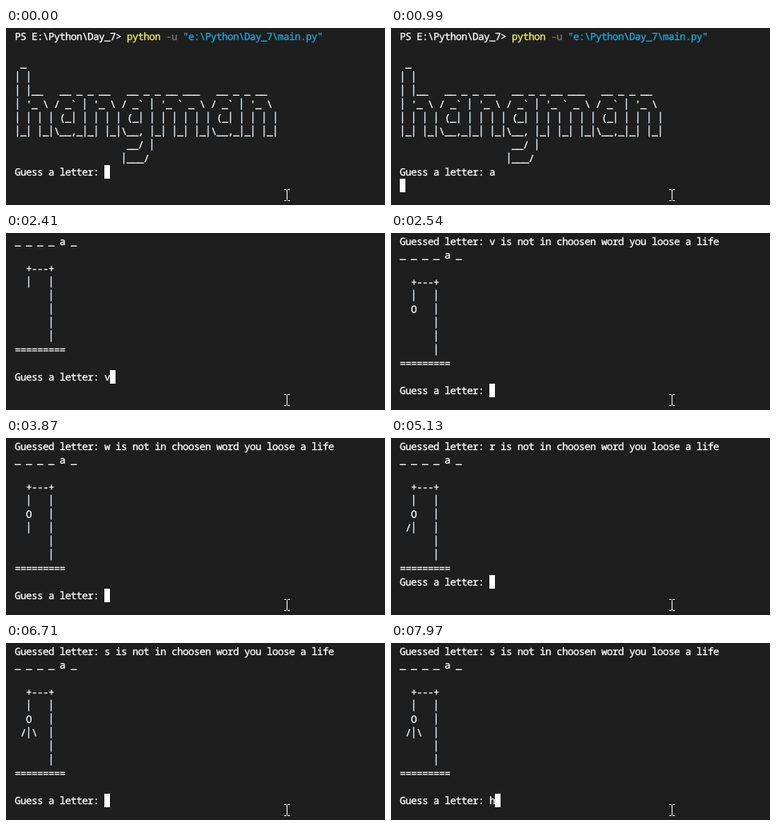
These frames come from a looping animation (474 by 222 pixels, 8000 ms). An HTML page:

```html
<!DOCTYPE html>
<html lang="en">
<head>
<meta charset="utf-8">
<title>Hangman in a terminal</title>
<style>
  html, body { margin: 0; width: 100%; height: 100%; overflow: hidden; background: #1e1e1e; }
  #stage { position: relative; width: 474px; height: 222px; overflow: hidden; }
  #screen {
    position: absolute; left: 11px; top: 2px; margin: 0;
    font: 12.5px/17px "Noto Sans Mono", "Liberation Mono", monospace;
    letter-spacing: -.5px; /* 7px cells */
    font-variant-ligatures: none; text-rendering: geometricPrecision;
    color: #fff; -webkit-text-stroke: .3px;
  }
  .cmd { color: #f5ef5a; }
  .opt { color: #767676; }
  .str { color: #1fa9dc; }
  /* tall bars that nearly join from row to row */
  #screen b {
    display: inline-block; width: 7px; line-height: 0; vertical-align: 1px;
    font-size: 14px; font-weight: 400; text-indent: -.7px; color: #e2f1fd;
  }
  #screen i { display: inline-block; width: 7px; height: 17px; vertical-align: top; background: #fff; }
  #mouse { position: absolute; left: 347px; top: 201px; }
</style>
</head>
<body>
<div id="stage">
  <pre id="screen"></pre>
  <svg id="mouse" width="9" height="17" fill="none" stroke="#fff">
    <path d="M1 1.5H3.5L4.5 2.5L5.5 1.5H8M4.5 2.5V14.5M1 15.5H3.5L4.5 14.5L5.5 15.5H8"/>
  </svg>
</div>
<template id="title">PS E:\Python\Day_7> <span class="cmd">python</span> <span class="opt">-u</span> <span class="str">"e:\Python\Day_7\main.py"</span>

 _
| |
| |__   __ _ _ __   __ _ _ __ ___   __ _ _ __
| '_ \ / _` | '_ \ / _` | '_ ` _ \ / _` | '_ \
| | | | (_| | | | | (_| | | | | | | (_| | | | |
|_| |_|\__,_|_| |_|\__, |_| |_| |_|\__,_|_| |_|
                    __/ |
                   |___/
</template>
<script>
  const LOOP = 8000;
  const CURSOR = "\u25ae";
  const screen = document.getElementById("screen");
  const title = document.getElementById("title").innerHTML;

  const ask = (typed = "") => "Guess a letter: " + typed + CURSOR;
  const enter = text => text.replace(CURSOR, "\n" + CURSOR);
  const miss = letter => `Guessed letter: ${letter} is not in choosen word you loose a life\n`;

  const gallows = (head, body) => [
    "_ _ _ _ a _", "",
    "  +---+",
    "  |   |",
    `  ${head}   |`,
    ` ${body}  |`,
    "      |",
    "      |",
    "=========", ""
  ].join("\n");

  const start = typed => title + ask(typed);
  const empty = typed => gallows(" ", "   ") + "\n" + ask(typed);
  const head = typed => miss("v") + gallows("O", "   ") + "\n" + ask(typed);
  const torso = typed => miss("w") + gallows("O", " | ") + "\n" + ask(typed);
  const oneArm = typed => miss("r") + gallows("O", "/| ") + ask(typed);
  const twoArms = typed => miss("s") + gallows("O", "/|\\") + "\n" + ask(typed);

  const scenes = [
    [0, start()],
    [860, start("a")],
    [950, enter(start("a"))],
    [1040, CURSOR],
    [1130, empty()],
    [2410, empty("v")],
    [2540, head()],
    [3670, head("w")],
    [3770, enter(head("w"))],
    [3870, torso()],
    [5000, torso("r")],
    [5130, oneArm()],
    [6510, oneArm("s")],
    [6710, twoArms()],
    [7970, twoArms("h")]
  ];

  let shown;
  function draw() {
    const time = performance.now() % LOOP;
    const scene = scenes.filter(([from]) => from <= time).pop();
    if (scene !== shown) {
      shown = scene;
      screen.innerHTML = scene[1].replace(/\|/g, "<b>|</b>").replace(CURSOR, "<i></i>");
    }
    requestAnimationFrame(draw);
  }
  draw();
</script>
</body>
</html>
```
